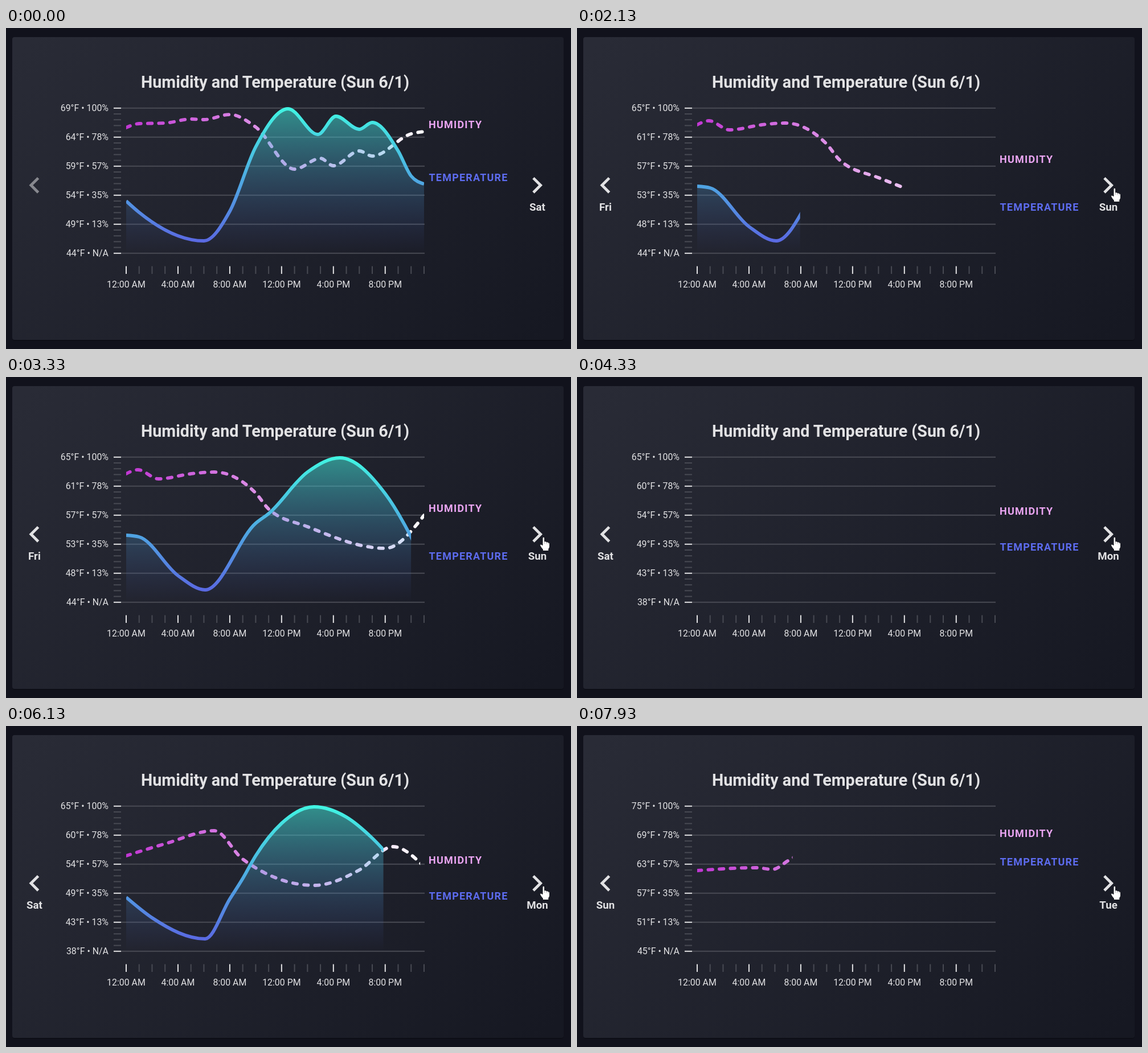
An HTML page for the animation above (8000 ms loop, 992x564 px).

```html
<!DOCTYPE html>
<html lang="en">
<head>
<meta charset="utf-8">
<title>Humidity and Temperature</title>
<style>
  html, body { margin: 0; width: 100%; height: 100%; overflow: hidden; background: #11121c; }
  svg { display: block; width: 992px; height: 564px; font-family: Roboto, sans-serif; fill: #e2e2e4; }
  .axis { font-size: 15.9px; }
  .title { font-size: 28.7px; font-weight: 700; }
  .nav { font-size: 18.7px; font-weight: 700; }
  .series { font-size: 18px; font-weight: 700; letter-spacing: 1.2px; }
  .line { fill: none; stroke-width: 5.8; }
</style>
</head>
<body>
<svg viewBox="0 0 992 564" xmlns="http://www.w3.org/2000/svg">
  <defs>
    <linearGradient id="card" gradientUnits="userSpaceOnUse" x1="130" y1="-70" x2="860" y2="634">
      <stop offset="0" stop-color="#292b36"/><stop offset="1" stop-color="#161822"/>
    </linearGradient>
    <linearGradient id="humGrad" gradientUnits="userSpaceOnUse" x1="211" y1="0" x2="734" y2="0">
      <stop offset="0" stop-color="#c137d3"/><stop offset="1" stop-color="#ffffff"/>
    </linearGradient>
    <linearGradient id="tempGrad" gradientUnits="userSpaceOnUse" x1="0" y1="141" x2="0" y2="376">
      <stop offset="0" stop-color="#41f4e2"/><stop offset="1" stop-color="#5a69e2"/>
    </linearGradient>
    <linearGradient id="areaGrad" gradientUnits="userSpaceOnUse" x1="0" y1="141" x2="0" y2="396">
      <stop offset="0" stop-color="#41f4e2" stop-opacity=".52"/><stop offset="1" stop-color="#5a69e2" stop-opacity="0"/>
    </linearGradient>
    <clipPath id="humClip"><rect id="humRect" x="211" y="120" width="523" height="280"/></clipPath>
    <clipPath id="tempClip"><rect id="tempRect" x="211" y="120" width="523" height="280"/></clipPath>
  </defs>

  <rect width="992" height="564" fill="#11121c"/>
  <rect x="11" y="18" width="968" height="532" rx="5" fill="#0b0c13" opacity=".6"/>
  <rect x="11" y="16" width="968" height="532" rx="4" fill="url(#card)"/>
  <text class="title" x="472.5" y="105" text-anchor="middle">Humidity and Temperature (Sun 6/1)</text>
  <g id="axes"></g>

  <g clip-path="url(#humClip)">
    <path id="hum" class="line" stroke="url(#humGrad)" stroke-linecap="round" stroke-dasharray="7.5 12"/>
  </g>
  <g clip-path="url(#tempClip)">
    <path id="area" fill="url(#areaGrad)"/>
    <path id="temp" class="line" stroke="url(#tempGrad)"/>
  </g>

  <text id="humLabel" class="series" x="742" fill="#eba5f3">HUMIDITY</text>
  <text id="tempLabel" class="series" x="742.5" fill="#5d6cf0">TEMPERATURE</text>

  <path id="prev" transform="translate(21.3 247.5) scale(2.4)" d="M15.41 7.41 14 6 8 12 14 18 15.41 16.59 10.83 12Z"/>
  <path transform="translate(903.6 247.5) scale(2.4)" d="M8.59 16.59 13.17 12 8.59 7.41 10 6 16 12 10 18Z"/>
  <text id="prevDay" class="nav" x="50" y="321" text-anchor="middle"></text>
  <text id="nextDay" class="nav" x="933" y="321" text-anchor="middle"></text>

  <g id="cursor" fill="#fff" stroke="#15161c" stroke-linejoin="round">
    <path id="arrow" d="M.5 .5V16.5L4.2 13 6.6 18.6 9 17.6 6.6 12.2H11.8Z"/>
    <g id="hand">
      <path d="M-1 2Q-1 .2 .8 .2T2.6 2V8Q5 7 6 9 8.4 8 9.2 10 11.4 9.6 11.5 12V17Q11.5 19 9.8 21V24.5H-.6V22Q-3 19.4-4.6 16.6-6 14.2-5 13.2-3.6 12.2-1 14.6Z"/>
      <path d="M2.6 8V12M6 9V12.5M9.2 10V13" fill="none" stroke="#8a8b90" stroke-width=".7"/>
    </g>
  </g>
</svg>
<script>
const LOOP = 8000, LEFT = 211, WIDTH = 523, STEP = WIDTH / 23, TOP = 141, BOTTOM = 396;
const $ = id => document.getElementById(id);
const set = (id, attrs) => { for (const k in attrs) $(id).setAttribute(k, attrs[k]); };

// Curves are given by their turning points: [hour, height]
const days = [
  {
    at: 0, start: -4000, hi: 69, lo: 44, labels: [170, 263], prev: '', next: 'Sat',
    hum: [[0, 175], [1, 168], [3, 167], [5, 160], [6, 161], [8, 152], [10, 174], [13, 248],
      [15, 229], [16, 242], [18, 216], [19, 225], [22, 186], [23, 182]],
    temp: [[0, 304], [1, 324], [6, 374], [8, 322], [10, 209], [12.5, 142], [14.8, 187],
      [16.2, 155], [18, 178], [19, 166], [21, 216], [22, 260], [23, 274]]
  },
  {
    at: 1265, start: 1239, hi: 65, lo: 44.3, labels: [231, 315], prev: 'Fri', next: 'Sun',
    hum: [[0, 170], [.9, 163], [2.5, 179], [5, 170], [6.8, 167], [10, 204], [11, 232], [14, 263], [20, 301], [23, 243]],
    temp: [[0, 278], [1, 281], [4, 349], [6.1, 374], [10, 257], [11, 240], [14, 167], [16.5, 142], [20, 205], [23, 326]]
  },
  {
    at: 4265, start: 4360, hi: 65, lo: 38, labels: [236, 298.5], prev: 'Sat', next: 'Mon',
    hum: [[0, 228], [3, 207], [6.8, 184], [9, 234], [14.5, 280], [18, 253], [20.6, 212], [23, 247]],
    temp: [[0, 301], [2, 337], [6.1, 374], [8, 304], [9, 268], [10, 228], [12, 171], [14.5, 142], [17, 160], [19, 197], [23, 310]]
  },
  {
    at: 7465, start: 7580, hi: 75, lo: 45, labels: [189, 239], prev: 'Sun', next: 'Tue',
    hum: [[0, 254], [4.6, 249], [5.8, 252], [7, 237], [9, 208]],
    temp: null
  }
];

// Monotone spline: flat at every peak and valley
function curve(points) {
  const slope = i => (points[i + 1][1] - points[i][1]) / (points[i + 1][0] - points[i][0]);
  const inner = i => {
    const a = slope(i - 1), b = slope(i);
    const h = points[i][0] - points[i - 1][0], k = points[i + 1][0] - points[i][0];
    const mean = (a * k + b * h) / (h + k);
    return (Math.sign(a) + Math.sign(b)) * Math.min(Math.abs(a), Math.abs(b), Math.abs(mean) / 2);
  };
  const last = points.length - 1;
  const tangent = i =>
    i === 0 ? (3 * slope(0) - inner(1)) / 2 :
    i === last ? (3 * slope(last - 1) - inner(last - 1)) / 2 : inner(i);
  const at = (h, y) => `${(LEFT + h * STEP).toFixed(2)} ${y.toFixed(2)}`;
  let d = 'M' + at(...points[0]);
  for (let i = 0; i < last; i++) {
    const [h0, y0] = points[i], [h1, y1] = points[i + 1], third = (h1 - h0) / 3;
    d += `C${at(h0 + third, y0 + tangent(i) * third)} ${at(h1 - third, y1 - tangent(i + 1) * third)} ${at(h1, y1)}`;
  }
  return d;
}

function buildAxes() {
  const bright = '#e2e2e4', dim = '#484a53';
  const line = (x1, y1, x2, y2, color) =>
    `<path d="M${x1} ${y1}L${x2} ${y2}" stroke="${color}" stroke-width="2"/>`;
  let out = '';
  for (let i = 0; i <= 25; i++) {
    const y = TOP + i * 10.2 - .2, major = i % 5 === 0;
    out += line(189, y, 202, y, major ? bright : dim);
    if (major) {
      out += line(202, y, 735, y, dim);
      out += `<text class="axis" id="y${i / 5}" x="180" y="${y + 5.4}" text-anchor="end"></text>`;
    }
  }
  for (let h = 0; h < 24; h++) {
    const x = LEFT + h * STEP, major = h % 4 === 0;
    out += line(x, 418.5, x, 432, major ? bright : dim);
    if (major) out += `<text class="axis" x="${x}" y="455.5" text-anchor="middle">${h % 12 || 12}:00 ${h < 12 ? 'AM' : 'PM'}</text>`;
  }
  $('axes').innerHTML = out;
}

const humidity = ['100%', '78%', '57%', '35%', '13%', 'N/A'];
let shown = null;

function showDay(day) {
  if (shown === day) return;
  shown = day;
  humidity.forEach((h, i) => {
    $('y' + i).textContent = `${Math.round(day.hi + (day.lo - day.hi) * i / 5)}°F • ${h}`;
  });
  const d = day.temp ? curve(day.temp) : '';
  set('hum', { d: curve(day.hum) });
  set('temp', { d });
  set('area', { d: d && `${d}V${BOTTOM}H${LEFT}Z` });
  set('humLabel', { y: day.labels[0] + 6 });
  set('tempLabel', { y: day.labels[1] + 6 });
  set('prev', { opacity: day.prev ? 1 : .52 });
  $('prevDay').textContent = day.prev;
  $('nextDay').textContent = day.next;
}

const clamp = v => Math.max(0, Math.min(1, v));
const easeOut = p => 1 - (1 - p) ** 2;
const smooth = p => p * p * (3 - 2 * p);
const reveal = ms => WIDTH * easeOut(clamp(ms / 2000));

function moveCursor(t) {
  const inward = easeOut(clamp((t - 110) / 450));
  const back = smooth(clamp((t - 570) / 160));
  const x = 988 - 67 * inward + 22 * back;
  const y = 556 - 284 * inward + 9 * back;
  set('cursor', { transform: `translate(${x} ${y})`, visibility: t < 130 ? 'hidden' : 'visible' });
  set('arrow', { display: t < 870 ? 'inline' : 'none' });
  set('hand', { display: t < 870 ? 'none' : 'inline' });
}

function render(t) {
  const day = days.filter(d => t >= d.at).pop();
  showDay(day);
  set('humRect', { width: reveal(t - day.start) });
  set('tempRect', { width: reveal(t - day.start - 510) });
  set('nextDay', { opacity: t >= 1130 && t < days[1].at ? .4 : 1 });
  moveCursor(t);
}

buildAxes();
const begin = performance.now();
function tick() {
  render((performance.now() - begin) % LOOP);
  requestAnimationFrame(tick);
}
tick();
</script>
</body>
</html>
```
